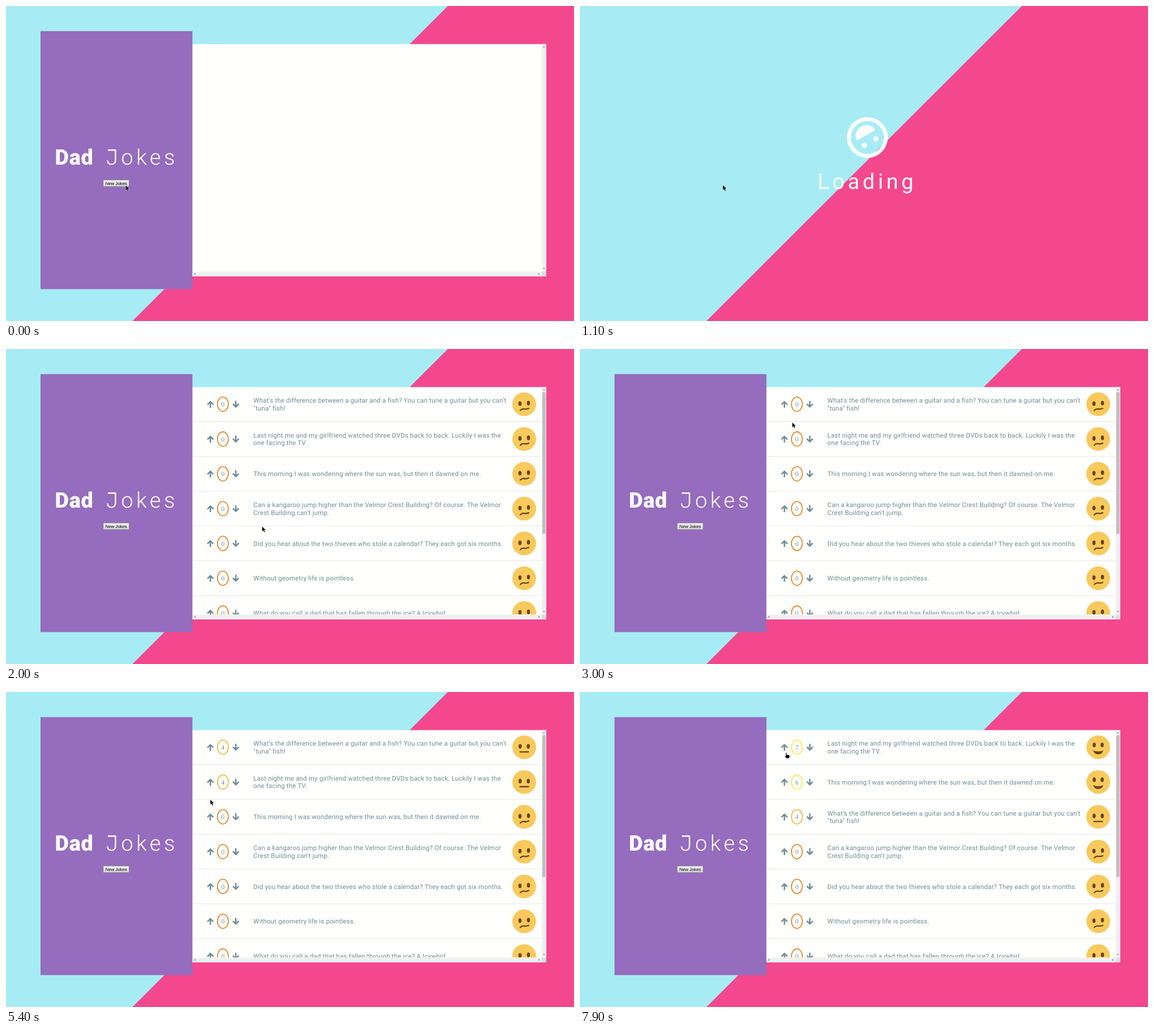
Animation of 1004 by 558 pixels, one loop 8000 ms. Source, as an HTML page:

```html
<!DOCTYPE html>
<html lang="en">
<head>
<meta charset="utf-8">
<title>Dad Jokes</title>
<style>
  html, body { margin: 0; width: 100%; height: 100%; overflow: hidden; background: #a7ecf4; }
  svg { display: block; width: 1004px; height: 558px; }
  text { font-family: Roboto, "Open Sans", sans-serif; text-rendering: geometricPrecision; white-space: pre; }
  .title { font-size: 38px; fill: #fff; }
  .bold { font-weight: 900; letter-spacing: .6px; }
  .light { font-weight: 300; letter-spacing: 5.5px; }
  .loading { font-weight: 400; letter-spacing: 5.6px; }
  .button { font: 7.8px "Liberation Sans", Arial, sans-serif; fill: #000; text-anchor: middle; }
  .joke { font-size: 11.5px; letter-spacing: .18px; fill: #6d8d95; }
  .votes { font: 11.5px "Liberation Serif", "Times New Roman", serif; fill: #6d8d95; text-anchor: middle; }
  .ring { fill: none; stroke-width: 1.8; }
  .arrow { fill: none; stroke: #6d8d95; stroke-width: 2.5; }
  .features { fill: #664516; }
  .mouth { fill: none; stroke: #664516; stroke-width: 2.3; stroke-linecap: round; }
  .cursor { stroke: #fff; stroke-width: .5; stroke-linejoin: round; }
</style>
</head>
<body>
<svg viewBox="0 0 1004 558">
  <defs>
    <linearGradient id="shine" x2="0" y2="1">
      <stop offset="0" stop-color="#f4f4f4"/>
      <stop offset="1" stop-color="#d6d6d6"/>
    </linearGradient>
    <clipPath id="list"><path d="M330 67.5H947V470.5H330z"/></clipPath>

    <g id="face0">
      <circle r="21" fill="#f8c95c"/>
      <g class="features">
        <ellipse cx="-7.5" cy="-1" rx="2.8" ry="4.1"/>
        <ellipse cx="7.5" cy="-2" rx="2.8" ry="4.1"/>
      </g>
      <path class="mouth" d="M-7 11Q-4 7.6 0 8.4T8 7.4"/>
    </g>
    <g id="face1">
      <circle r="21" fill="#f8c95c"/>
      <g class="features">
        <ellipse cx="-7.2" cy="-1.5" rx="2.8" ry="4.1"/>
        <ellipse cx="7.2" cy="-1.5" rx="2.8" ry="4.1"/>
      </g>
      <path class="mouth" d="M-7.5 8.3H7.5"/>
    </g>
    <g id="face2">
      <circle r="21" fill="#f8c95c"/>
      <g class="features">
        <ellipse cx="-7" cy="-4" rx="2.8" ry="4.1"/>
        <ellipse cx="7" cy="-4" rx="2.8" ry="4.1"/>
        <path d="M-9 5.6Q0 9.4 9 5.6Q7 12.4 0 12.4T-9 5.6z"/>
      </g>
    </g>
    <path id="up" class="arrow" d="M-5.2 .8L0 -4.4L5.2 .8M0 -4V6.3"/>
  </defs>

  <path fill="#a7ecf4" d="M0 0H1004V558H0z"/>
  <path fill="#f3488d" d="M781 0H1004V558H223.5z"/>

  <g id="app">
    <path fill="#fffffe" d="M329 67.5H955V479H329z"/>
    <g id="rows" clip-path="url(#list)"></g>
    <path fill="#f0f0f0" d="M947 67.5H955V470.5H947zM330 470.5H947V479H330z"/>
    <path fill="#dcdcdc" d="M947 470.5H955V479H947z"/>
    <path id="thumb" fill="#bfbfbf" d="M948 76.5H954V327.5H948z"/>
    <path fill="#858585" d="M948.8 73.3h4.2l-2.1-2.4zM948.8 464.2h4.2l-2.1 2.4zM334.8 472.5v4.2l-2.4-2.1zM941 472.5v4.2l2.4-2.1z"/>

    <path fill="#956cbe" d="M61 44.5H329.5V501.5H61z"/>
    <text class="title bold" x="86.5" y="281">Dad</text>
    <text class="title light" x="177" y="281">Jokes</text>
    <path fill="#fff" d="M180 254H193V256.5H180z"/>
    <rect x="172" y="308.2" width="45.6" height="11.6" fill="url(#shine)" stroke="#8d8d8d" stroke-width=".8"/>
    <text class="button" x="194.9" y="316.6">New Jokes</text>
  </g>

  <g id="loader">
    <g id="spinner" fill="#fff">
      <circle r="32.6" fill="none" stroke="#fff" stroke-width="6.8"/>
      <circle cx="-11.6" cy="-9.3" r="4.7"/>
      <circle cx="11.6" cy="-9.3" r="4.7"/>
      <path d="M16.6 4.6H-16.6C-17.8 4.6-18.7 5.7-18.6 6.8C-17.5 15.4-10 22-1 22H1C10 22 17.5 15.4 18.6 6.8C18.7 5.7 17.8 4.6 16.6 4.6z"/>
    </g>
    <text class="title loading" x="420" y="324">Loading</text>
  </g>

  <g id="cursor">
    <path id="pointer" class="cursor" d="M0 0V9.4L2.2 7.5L3.9 11L5.5 10.2L3.9 6.9H6.9z"/>
    <path id="hand" class="cursor" d="M2 .8Q3 -.2 3.7 .8V4L8 4.8Q9 5.2 8.8 6.5L8 10.5H2.8L.2 6.8Q.2 5.6 2 6.2z"/>
    <path id="beam" fill="none" stroke="#333" d="M-2 .5H2M0 .5V9.5M-2 9.5H2"/>
  </g>
</svg>

<script>
const LOOP = 8000, STEP = 100;
const LOAD_START = 300, LOAD_END = 2000;
const ROW_Y = 97.8, ROW_H = 61.65;
const RING = ['#ea8b2f', '#efbd42', '#f8ee5a'];

const JOKES = [
  ["What's the difference between a guitar and a fish? You can tune a guitar but you can't", '"tuna" fish!'],
  ['Last night me and my girlfriend watched three DVDs back to back. Luckily I was the', 'one facing the TV.'],
  ['This morning I was wondering where the sun was, but then it dawned on me.'],
  ['Can a kangaroo jump higher than the Velmor Crest Building? Of course. The Velmor', "Crest Building can't jump."],
  ['Did you hear about the two thieves who stole a calendar? They each got six months.'],
  ['Without geometry life is pointless.'],
  ['What do you call a dad that has fallen through the ice? A Icywhirl.']
];

// time, joke, votes after the click
const CLICKS = [
  [3300, 0, 1], [3400, 0, 2], [3500, 0, 3], [3700, 0, 4],
  [4400, 1, 1], [4800, 1, 2], [4900, 1, 4],
  [5800, 2, 1], [5900, 2, 2], [6000, 2, 3], [6100, 2, 4], [6200, 2, 5],
  [6400, 1, 5], [7100, 1, 6], [7500, 2, 6], [7900, 1, 7]
];

// joke, from, to: a face that is still being fetched
const MISSING = [[0, 3500, 4400], [1, 7100, 7300]];

// time, x, y, shape from that time on
const PATH = [
  [0, 211.5, 317.5, 'pointer'], [1000, 211.5, 317.5, 'pointer'],
  [1600, 457, 314, 'beam'], [1900, 457, 314, 'beam'],
  [2000, 452.5, 314, 'pointer'], [2300, 452.5, 314, 'pointer'],
  [3100, 364, 103.5, 'hand'], [3800, 364, 103.5, 'hand'],
  [3900, 368.7, 176.5, 'pointer'], [4000, 378, 177, 'pointer'],
  [4200, 362, 175, 'pointer'], [4400, 359.5, 170, 'hand'],
  [5200, 359.5, 170, 'hand'], [5300, 361, 179, 'pointer'],
  [5700, 361, 224.5, 'hand'], [6600, 361, 224.5, 'hand'],
  [6700, 361, 214, 'pointer'], [7000, 363, 170, 'hand'],
  [7200, 363, 170, 'hand'], [7400, 363, 155, 'hand'],
  [7600, 363, 155, 'hand'], [7900, 361.8, 107, 'hand'], [8000, 361.8, 107, 'hand']
];

const $ = id => document.getElementById(id);
const show = (node, on) => node.setAttribute('display', on ? 'inline' : 'none');
const level = votes => votes < 3 ? 0 : votes < 6 ? 1 : 2;

function makeRow(lines) {
  const row = document.createElementNS('http://www.w3.org/2000/svg', 'g');
  const top = lines.length > 1 ? -2.4 : 4.2;
  row.innerHTML = `
    <use href="#up" x="361.3"/>
    <use href="#up" transform="translate(406.2 .3) scale(1 -1)"/>
    <ellipse class="ring" cx="383.4" rx="9.6" ry="12.7"/>
    <text class="votes" x="383.4" y="4.2"></text>
    ${lines.map((line, i) => `<text class="joke" x="437.3" y="${top + i * 13.4}">${line}</text>`).join('')}
    <use class="face" x="916"/>
    <path stroke="#e4e6e6" d="M330 30.8H947"/>`;
  $('rows').append(row);
  const [ring, votes, face] = ['.ring', '.votes', '.face'].map(s => row.querySelector(s));
  return { row, ring, votes, face };
}
const rows = JOKES.map(makeRow);

function drawRows(t) {
  const votes = JOKES.map(() => 0);
  let order = JOKES.map((_, i) => i);
  for (const [at, joke, count] of CLICKS) {
    if (t < at) break;
    votes[joke] = count;
    order.sort((a, b) => votes[b] - votes[a]);
  }
  order.forEach((joke, place) => {
    const part = rows[joke], mood = level(votes[joke]);
    part.row.setAttribute('transform', `translate(0 ${ROW_Y + place * ROW_H})`);
    part.ring.setAttribute('stroke', RING[mood]);
    part.votes.textContent = votes[joke];
    part.face.setAttribute('href', '#face' + mood);
    show(part.face, !MISSING.some(([j, from, to]) => j === joke && t >= from && t < to));
  });
}

function drawCursor(t) {
  const i = PATH.findIndex(p => p[0] > t);
  const [t0, x0, y0, shape] = PATH[i - 1], [t1, x1, y1] = PATH[i];
  const k = (t - t0) / (t1 - t0);
  const x = x0 + (x1 - x0) * k, y = y0 + (y1 - y0) * k;
  $('cursor').setAttribute('transform', `translate(${x} ${y})`);
  for (const id of ['pointer', 'hand', 'beam']) show($(id), id === shape);
}

function draw(t) {
  const loading = t >= LOAD_START && t < LOAD_END, loaded = t >= LOAD_END;
  show($('app'), !loading);
  show($('loader'), loading);
  show($('rows'), loaded);
  show($('thumb'), loaded);
  const angle = 6 + (t - LOAD_START) * .18;
  $('spinner').setAttribute('transform', `translate(508 233) rotate(${angle})`);
  drawRows(t);
  drawCursor(t);
}

const start = performance.now();
let last = -1;
function tick(now) {
  const t = Math.floor(Math.max(0, now - start) % LOOP / STEP) * STEP;
  if (t !== last) draw(last = t);
  requestAnimationFrame(tick);
}
draw(0);
requestAnimationFrame(tick);
</script>
</body>
</html>
```
